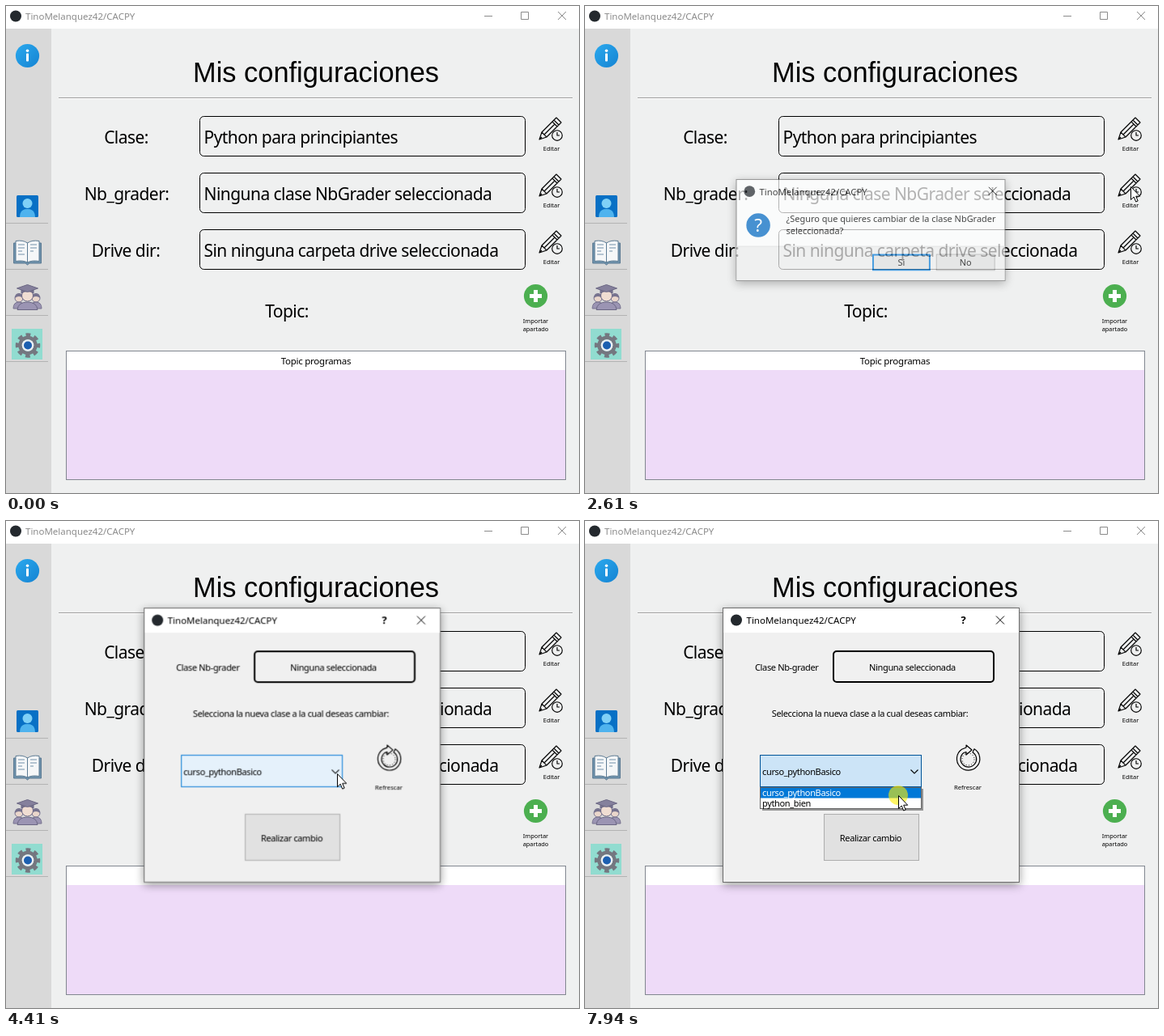
Write an HTML page that moves like this. It is 708 px wide and 602 px high and loops after 8 s.

```html
<!DOCTYPE html>
<html lang="es">
<head>
<meta charset="utf-8">
<title>Mis configuraciones</title>
<style>
html, body { margin: 0; width: 100%; height: 100%; overflow: hidden; background: #eff0f0; }
svg { display: block; width: 100vw; height: 100vh; font-family: "Noto Sans", "Open Sans", sans-serif; }
.h1 { font: 34.4px "Liberation Sans", Arial, sans-serif; }
.big { font-size: 21px; letter-spacing: -.55px; }
.ui { font-size: 11px; letter-spacing: -.35px; }
.msg { font-size: 11.1px; }
.cap { font-size: 11.5px; }
.tiny { font-size: 7.4px; }
.mid { text-anchor: middle; }
.line { fill: none; stroke: currentColor; }
.field { fill: none; stroke: #000; }
.btn { fill: #e1e1e1; stroke: #adadad; }
.frame { stroke: #6d6d6d; filter: drop-shadow(0 3px 6px rgba(0,0,0,.4)); }

.win, .ask, .pick, .yes, .combo, .list, .sel, .row1, .row2, .cursor, .halo {
  animation: 8s linear infinite;
}
.win { color: #8b8b8b; animation-name: active; animation-timing-function: step-end; }
.ask { transform-origin: 352.5px 277px; animation-name: ask; }
.pick { transform-origin: 353.5px 277px; animation-name: pick; }
.yes { fill: #e1e1e1; stroke: #0078d7; stroke-width: 2; animation-name: yes; }
.combo { fill: #e5f1fb; stroke: #0078d7; animation-name: combo; animation-timing-function: step-end; }
.list { animation-name: list; }
.sel { fill: #0078d7; animation-name: sel; animation-timing-function: step-end; }
.row1 { fill: #fff; animation-name: row1; animation-timing-function: step-end; }
.row2 { fill: #000; animation-name: row2; animation-timing-function: step-end; }
.cursor { animation-name: move; }
.halo { fill: #fff000; opacity: 0; animation-name: click; animation-timing-function: step-end; }

@keyframes active {
  0%, 31%, 51.1% { color: #8b8b8b; }
  28.5%, 47.875% { color: #000; }
}
@keyframes ask {
  0%, 30.95% { opacity: 0; transform: scale(.93); }
  31% { opacity: .1; transform: scale(.95); }
  32.625% { opacity: .7; transform: scale(.985); }
  34.25% { opacity: 1; transform: scale(.997); }
  35.25%, 51% { opacity: 1; transform: none; }
  52.75% { opacity: .27; transform: scale(.967); }
  53.5%, 100% { opacity: 0; transform: scale(.95); }
}
@keyframes pick {
  0%, 51.1% { opacity: 0; transform: scale(.93); }
  52.75% { opacity: .57; transform: scale(.978); }
  54.4% { opacity: 1; transform: scale(.996); }
  55.3%, 100% { opacity: 1; transform: none; }
}
@keyframes yes {
  0%, 44.5% { fill: #e1e1e1; }
  47%, 100% { fill: #e5f1fb; }
}
@keyframes combo {
  0% { fill: #e5f1fb; stroke: #0078d7; }
  69.3%, 100% { fill: #cce4f7; stroke: #005499; }
}
@keyframes list {
  0%, 69.9% { clip-path: inset(0 0 100% 0); }
  72.3%, 100% { clip-path: inset(-1px); }
}
@keyframes sel {
  0%, 87.4% { transform: none; }
  79%  { transform: translateY(13px); }
}
@keyframes row1 {
  0%, 87.4% { fill: #fff; }
  79% { fill: #000; }
}
@keyframes row2 {
  0%, 87.4% { fill: #000; }
  79% { fill: #fff; }
}
@keyframes click {
  0%, 31%, 50.3%, 71% { opacity: 0; }
  28.5%, 47.875%, 68.5%, 99.25%, 100% { opacity: .6; }
}
@keyframes move {
  0%, 7.37% { transform: translate(720px, 620px); }
  7.375% { transform: translate(703px, 588px); }
  9.8% { transform: translate(686px, 430px); }
  11.875%, 16.82% { transform: translate(691px, 340px); }
  16.875% { transform: translate(688px, 317px); }
  20.2% { transform: translate(680px, 255px); }
  24.375%, 37.5% { transform: translate(674px, 223px); }
  40.3% { transform: translate(540px, 270px); }
  43% { transform: translate(425px, 301px); }
  47%, 54% { transform: translate(409px, 314px); }
  57.75% { transform: translate(409px, 308px); }
  58.625%, 71.5% { transform: translate(409px, 307px); }
  77.75% { transform: translate(396px, 341px); }
  80.25%, 84.3% { transform: translate(390px, 348px); }
  90.125%, 100% { transform: translate(387px, 339px); }
}
</style>
</head>
<body>
<svg viewBox="0 0 708 602" preserveAspectRatio="none">
  <defs>
    <linearGradient id="sky" x2="1" y2="1">
      <stop stop-color="#2ba9ee"/><stop offset="1" stop-color="#1583d2"/>
    </linearGradient>
    <g id="edit">
      <g fill="none" stroke="#000" stroke-width="1.15" stroke-linejoin="round">
        <path d="M1 28L4 19L22 1L28 7L10 25ZM4 19L10 25M19 4L25 10M17 6L23 12M7 22L20 9M1 28L4 25"/>
        <circle cx="23" cy="23" r="6.3" fill="#eff0f0"/>
        <path d="M23 19V23H26"/>
      </g>
      <text class="tiny mid" x="16" y="41.5">Editar</text>
    </g>
    <path id="x" class="line" d="M-5 -5L5 5M5 -5L-5 5"/>
    <g id="head">
      <circle r="5" fill="#ead6cb" stroke="#77738f"/>
      <path d="M-5 0Q-5 -6 0 -6T5 0Q0 -4 -5 0Z" fill="#77738f"/>
      <path d="M-7 13Q-7 5 0 5T7 13Z" fill="#9b94b3" stroke="#77738f"/>
    </g>
  </defs>

  <rect width="708" height="602" fill="#eff0f0"/>
  <rect y="28" width="56" height="574" fill="#d9d9d9"/>
  <rect width="708" height="28" fill="#fff"/>
  <circle cx="12" cy="12.5" r="7" fill="#24292e"/>
  <g class="win">
    <text class="cap" x="24" y="17" fill="currentColor">TinoMelanquez42/CACPY</text>
    <path class="line" d="M591 12.5H601M636.5 7.5H645.5V16.5H636.5Z"/>
    <use href="#x" x="687" y="12"/>
  </g>

  <!-- sidebar -->
  <circle cx="26.5" cy="61.5" r="14.6" fill="url(#sky)"/>
  <g fill="#fff"><circle cx="26.5" cy="55.3" r="1.8"/><rect x="25" y="58.5" width="3" height="10" rx="1"/></g>
  <path d="M0 268.5H52M0 325.5H52M0 382.5H52M0 439.5H52" stroke="#b3b3b3"/>
  <rect x="13" y="234" width="27" height="27" rx="1.5" fill="#0870c5"/>
  <path d="M17 261Q17 251 26.5 251T36 261Z" fill="#4fb3ee"/>
  <circle cx="26.5" cy="244" r="6" fill="#7fd0f7"/>
  <g stroke="#5d7b93" stroke-linejoin="round">
    <path d="M9.5 293H43.5V318H29L26.5 320L24 318H9.5Z" fill="#6f93ad"/>
    <path d="M12 290.5Q21 289 26.5 293V317Q21 314 12 315.5ZM41 290.5Q32 289 26.5 293V317Q32 314 41 315.5Z" fill="#f5f7f8"/>
    <path d="M15 295H23M15 299H23M15 303H20M15 307H23M30 295H38M30 299H38M30 303H34" stroke="#9eb4c4" stroke-width="1.3"/>
  </g>
  <use href="#head" x="16" y="361"/>
  <use href="#head" x="37" y="361"/>
  <g stroke="#6b6784" stroke-linejoin="round">
    <path d="M14 375.5Q15 366 26.5 366T39 375.5Z" fill="#9b94b3"/>
    <circle cx="26.5" cy="358" r="7" fill="#f0ddd2"/>
    <path d="M19 350V355Q26.5 350 34 355V350Z" fill="#77738f"/>
    <path d="M13.5 349L26.5 344.5L39.5 349L26.5 353.5Z" fill="#85809c"/>
  </g>
  <rect x="7" y="399" width="38" height="38" fill="#91dcd0"/>
  <g transform="translate(27 419.5)">
    <circle r="9.5" fill="none" stroke="#747780" stroke-width="4.5"/>
    <circle r="13" fill="none" stroke="#747780" stroke-width="4.5" stroke-dasharray="5.7 4.51" stroke-dashoffset="2.85"/>
    <circle r="7.3" fill="#eceff3"/>
    <circle r="5" fill="#1c5fb0"/>
  </g>

  <!-- settings -->
  <text class="h1 mid" x="383" y="94">Mis configuraciones</text>
  <path d="M65 113.5H700" stroke="#a0a0a0"/>
  <path d="M65 114.5H700" stroke="#fff"/>
  <g class="big">
    <g class="mid">
      <text x="148.5" y="170">Clase:</text>
      <text x="149" y="240">Nb_grader:</text>
      <text x="148" y="310">Drive dir:</text>
      <text x="347" y="385">Topic:</text>
    </g>
    <text x="244.5" y="170">Python para principiantes</text>
    <text x="244.5" y="240">Ninguna clase NbGrader seleccionada</text>
    <text x="244.5" y="310">Sin ninguna carpeta drive seleccionada</text>
  </g>
  <g class="field">
    <rect x="239.5" y="136.5" width="402" height="49" rx="5"/>
    <rect x="239.5" y="206.5" width="402" height="49" rx="5"/>
    <rect x="239.5" y="276.5" width="402" height="49" rx="5"/>
  </g>
  <use href="#edit" x="658" y="137"/>
  <use href="#edit" x="658" y="207"/>
  <use href="#edit" x="658" y="277"/>
  <circle cx="654.5" cy="358.5" r="14.6" fill="#4caf50"/>
  <path d="M654.5 351V366M647 358.5H662" stroke="#fff" stroke-width="5"/>
  <g class="tiny mid">
    <text x="654.5" y="392">Importar</text>
    <text x="654.5" y="402">apartado</text>
  </g>
  <rect x="74.5" y="426.5" width="617" height="159" fill="#eedbf8" stroke="#828790"/>
  <rect x="75" y="427" width="616" height="23" fill="#fff"/>
  <text class="mid" x="383" y="443" font-size="11.5" letter-spacing="-.25">Topic programas</text>

  <!-- class picker -->
  <g class="pick">
    <rect class="frame" x="170.5" y="107.5" width="366" height="339" fill="#f0f0f0"/>
    <rect x="171" y="108" width="365" height="30" fill="#fff"/>
    <circle cx="187" cy="122.5" r="7" fill="#24292e"/>
    <text class="cap" x="199.5" y="127">TinoMelanquez42/CACPY</text>
    <text class="mid" x="467.5" y="127" font-size="13" font-weight="600">?</text>
    <use href="#x" x="513" y="122.5"/>
    <g class="ui">
      <text x="210" y="185">Clase Nb-grader</text>
      <rect class="field" x="307" y="161" width="198" height="38" rx="4" stroke-width="2"/>
      <text class="mid" x="404.5" y="185">Ninguna seleccionada</text>
      <text class="mid" x="352" y="242">Selecciona la nueva clase a la cual deseas cambiar:</text>
      <rect class="combo" x="216.5" y="289.5" width="199" height="39"/>
      <text x="219" y="314">curso_pythonBasico</text>
      <path class="line" d="M402.5 307.5L407 312L411.5 307.5" stroke-width="1.1"/>
      <rect class="btn" x="295.5" y="362.5" width="117" height="57"/>
      <text class="mid" x="353" y="396">Realizar cambio</text>
    </g>
    <g class="line" stroke-width="1.2" stroke-linejoin="round">
      <path d="M481 281.8A14.2 14.2 0 1 1 465.5 282.3L471 280V277L478 283L471 289V285.5L468 286.5A9.8 9.8 0 1 0 479 286Z"/>
      <circle cx="473.5" cy="294.5" r="7.5" stroke-dasharray="1 2.4" stroke-width="1"/>
    </g>
    <text class="mid" x="473" y="332" font-size="7.7">Refrescar</text>
    <g class="list ui">
      <rect x="219" y="331" width="199" height="27" fill="#777" opacity=".75"/>
      <rect x="216.5" y="329.5" width="199" height="26" fill="#fff" stroke="#646464"/>
      <rect class="sel" x="217" y="330" width="198" height="12.5"/>
      <text class="row1" x="219" y="340">curso_pythonBasico</text>
      <text class="row2" x="219" y="353">python_bien</text>
    </g>
  </g>

  <!-- confirmation -->
  <g class="ask">
    <rect class="frame" x="184.5" y="213.5" width="337" height="127" fill="#fff"/>
    <rect x="185" y="297" width="336" height="43" fill="#f0f0f0"/>
    <path d="M185 297.5H521" stroke="#dfdfdf"/>
    <circle cx="201" cy="228.5" r="7" fill="#24292e"/>
    <text class="cap" x="213.5" y="233">TinoMelanquez42/CACPY</text>
    <use href="#x" x="506" y="228"/>
    <circle cx="212" cy="271" r="15" fill="#0069c4"/>
    <text class="mid" x="212" y="279.5" font-size="23" fill="#fff">?</text>
    <g class="msg">
      <text x="247" y="267">¿Seguro que quieres cambiar de la clase NbGrader</text>
      <text x="247" y="282">seleccionada?</text>
    </g>
    <rect class="yes" x="356" y="308" width="71" height="19"/>
    <rect class="btn" x="435.5" y="307.5" width="73" height="20"/>
    <g class="msg mid">
      <text x="391.5" y="322">Si</text>
      <text x="472" y="322">No</text>
    </g>
  </g>

  <g class="cursor">
    <circle class="halo" r="12"/>
    <path d="M.5 .5V16.5L4.2 13L6.7 19L9.2 18L6.7 12.2H11.7Z" fill="#fff" stroke="#000"/>
  </g>
</svg>
</body>
</html>
```
